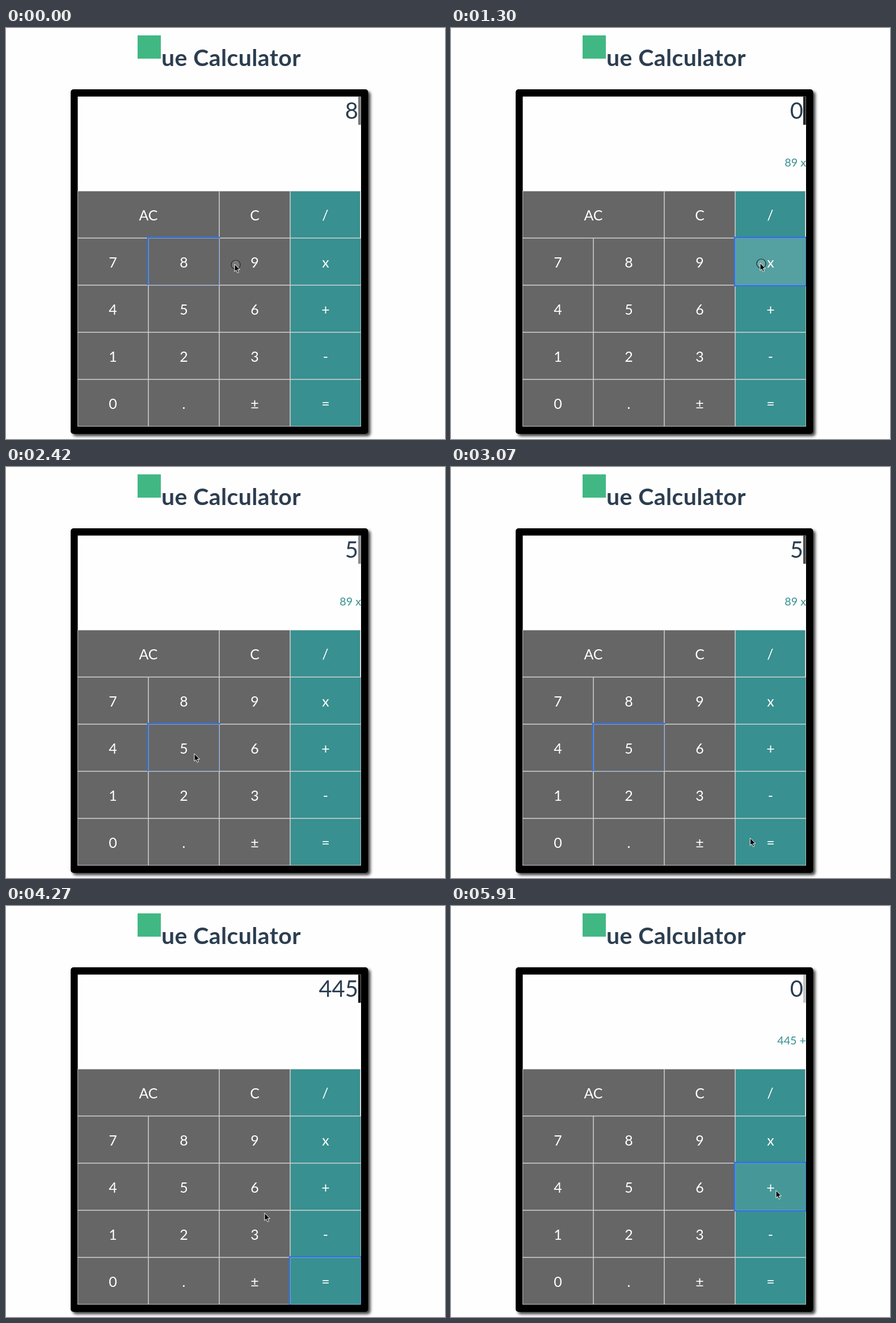
Recreate the animation shown at these times as an HTML page. Size 774 by 724 pixels, loop 6.01 s.

```html
<!DOCTYPE html>
<html lang="en">
<head>
<meta charset="utf-8">
<title>Vue Calculator</title>
<style>
  html, body { margin: 0; width: 100%; height: 100%; overflow: hidden; background: #fefefe; }
  svg { display: block; width: 774px; height: 724px; }
  text { font-family: Lato, sans-serif; }
  .title { font-size: 41px; font-weight: 700; letter-spacing: .4px; fill: #2c3e50; }
  .case { filter: drop-shadow(4px 4px 2.5px rgba(0, 0, 0, .75)); }
  .key text { font-size: 25px; fill: #fff; text-anchor: middle; }
  .ring { fill: none; stroke: #3273dc; stroke-width: 2.6; }
  #main { font-size: 40px; fill: #2c3e50; text-anchor: end; }
  #sub { font-size: 19.7px; fill: #389090; text-anchor: end; }
</style>
</head>
<body>
<svg viewBox="0 0 774 724" xmlns="http://www.w3.org/2000/svg">
  <defs><clipPath id="screen"><rect x="126" y="120.5" width="500" height="581.8"/></clipPath></defs>
  <rect width="774" height="724" fill="#fefefe"/>
  <rect x="232" y="13" width="41" height="41" fill="#41b883"/>
  <text class="title" x="274" y="67">ue Calculator</text>
  <rect class="case" x="114" y="108" width="524.5" height="607" rx="5"/>
  <g clip-path="url(#screen)">
    <rect x="126.5" y="120.5" width="499.5" height="582" fill="#fefefe"/>
    <text id="main" x="621" y="160"></text>
    <text id="sub" x="626" y="244"></text>
    <rect id="caret" x="621" y="121" width="4.6" height="49.5"/>
    <g id="keys"></g>
    <rect id="hot" class="ring"/>
  </g>
  <g id="cursor">
    <circle id="tap" cx="2" cy="1" r="8" fill="#fff" fill-opacity=".12" stroke="#222" stroke-width="1.2"/>
    <path d="M0 0V13.2L3 10.5L5.1 15.4L7.4 14.4L5.3 9.7H9.4Z" stroke="#fff" stroke-linejoin="round"/>
  </g>
</svg>
<script>
const LOOP = 6010, STEP = 158;
const $ = id => document.getElementById(id);

// Moments where the stepped clock restarts; it ticks evenly between them.
const anchors = [0, 140, 1300, 2420, 3520, 4870, 5170, 5910, LOOP];

// Stops of the pointer; those with a key are clicks.
const stops = [
  { t: 140, x: 403, y: 416, key: '9' },
  { t: 1300, x: 545, y: 414, key: 'x' },
  { t: 2260, x: 332, y: 505, key: '5' },
  { t: 3360, x: 553, y: 673, key: '=' },
  { t: 4700, x: 431, y: 507 },
  { t: 5760, x: 573, y: 501, key: '+' }
];
const clicks = stops.filter(s => s.key);
const isOperator = key => '/x+-'.includes(key);

function el(name, attrs, parent) {
  const node = document.createElementNS('http://www.w3.org/2000/svg', name);
  setAll(node, attrs);
  parent.appendChild(node);
  return node;
}

function setAll(node, attrs) {
  for (const k in attrs) node.setAttribute(k, attrs[k]);
}

const show = (node, on) => node.setAttribute('visibility', on ? 'visible' : 'hidden');

const keys = {};

function addKey(label, col, row, span = 1) {
  const x = 126 + 125 * col, y = 287 + 83 * row, w = 125 * span;
  const box = { x: x - .9, y: y - .9, width: w + 1.6, height: 84.8 };
  const g = el('g', { class: 'key' }, $('keys'));
  el('rect', { x, y, width: w, height: 83, fill: '#d2d2d2' }, g);
  el('rect', { x: x + .75, y: y + .75, width: w - 1.5, height: 81.5,
    fill: col === 3 ? '#389090' : '#666' }, g);
  el('text', { x: x + w / 2, y: y + 51.5 }, g).textContent = label;
  keys[label] = { g, box, ring: el('rect', { class: 'ring', ...box }, g) };
}

addKey('AC', 0, 0, 2);
addKey('C', 2, 0);
addKey('/', 3, 0, .992);
['789x', '456+', '123-', '0.±='].forEach((line, r) =>
  [...line].forEach((label, c) => addKey(label, c, r + 1)));

const compute = {
  '/': (a, b) => a / b,
  'x': (a, b) => a * b,
  '+': (a, b) => a + b,
  '-': (a, b) => a - b
};

function press({ entry, pending }, key) {
  if (isOperator(key)) return { entry: '0', pending: `${entry} ${key}` };
  if (key === '=') {
    const [a, op] = pending.split(' ');
    return { entry: String(compute[op](+a, +entry)), pending: '' };
  }
  return { entry: entry === '0' ? key : entry + key, pending };
}

function snap(t) {
  const i = anchors.findIndex(a => a > t);
  const from = anchors[i - 1], gap = anchors[i] - from;
  const step = gap / Math.max(1, Math.round(gap / STEP));
  return from + Math.floor((t - from) / step) * step;
}

// The pointer rests after each stop, then glides and arrives a little early.
function pointer(t) {
  const i = stops.findIndex(s => s.t > t);
  const to = stops.at(i), from = stops[i - 1] || to;
  if (i < 0) return [to.x, to.y];
  const leave = from.t + 300, arrive = to.t - 180;
  const u = Math.min(1, Math.max(0, (t - leave) / (arrive - leave)));
  const e = u * u * (3 - 2 * u);
  return [from.x + (to.x - from.x) * e, from.y + (to.y - from.y) * e];
}

const blink = t => ((1 + Math.cos(2 * Math.PI * (t / 1000 - .2))) / 2) ** 1.5;

function flash(key, age) {
  const fade = isOperator(key) ? 300 : 130;
  return Math.min(1, .85 + .15 * age / fade);
}

function draw(now) {
  const t = snap(now % LOOP);
  const done = clicks.filter(c => c.t <= t);
  const { entry, pending } = done.reduce((s, c) => press(s, c.key), { entry: '8', pending: '' });
  const last = done.at(-1) || { t: -LOOP, key: '8' };
  const glow = flash(last.key, t - last.t);

  $('main').textContent = entry;
  $('sub').textContent = pending;
  $('caret').setAttribute('opacity', blink(t));
  for (const label in keys) {
    const on = label === last.key;
    keys[label].g.setAttribute('opacity', on ? glow : 1);
    show(keys[label].ring, on);
  }
  // A pressed key shows its whole ring above the neighbours.
  setAll($('hot'), keys[last.key].box);
  show($('hot'), glow < 1);
  show($('tap'), clicks.some(c => t >= c.t - 150 && t < c.t + 130));
  $('cursor').setAttribute('transform', `translate(${pointer(t)})`);
}

const start = performance.now();
function loop() {
  draw(performance.now() - start);
  requestAnimationFrame(loop);
}
loop();
</script>
</body>
</html>
```
